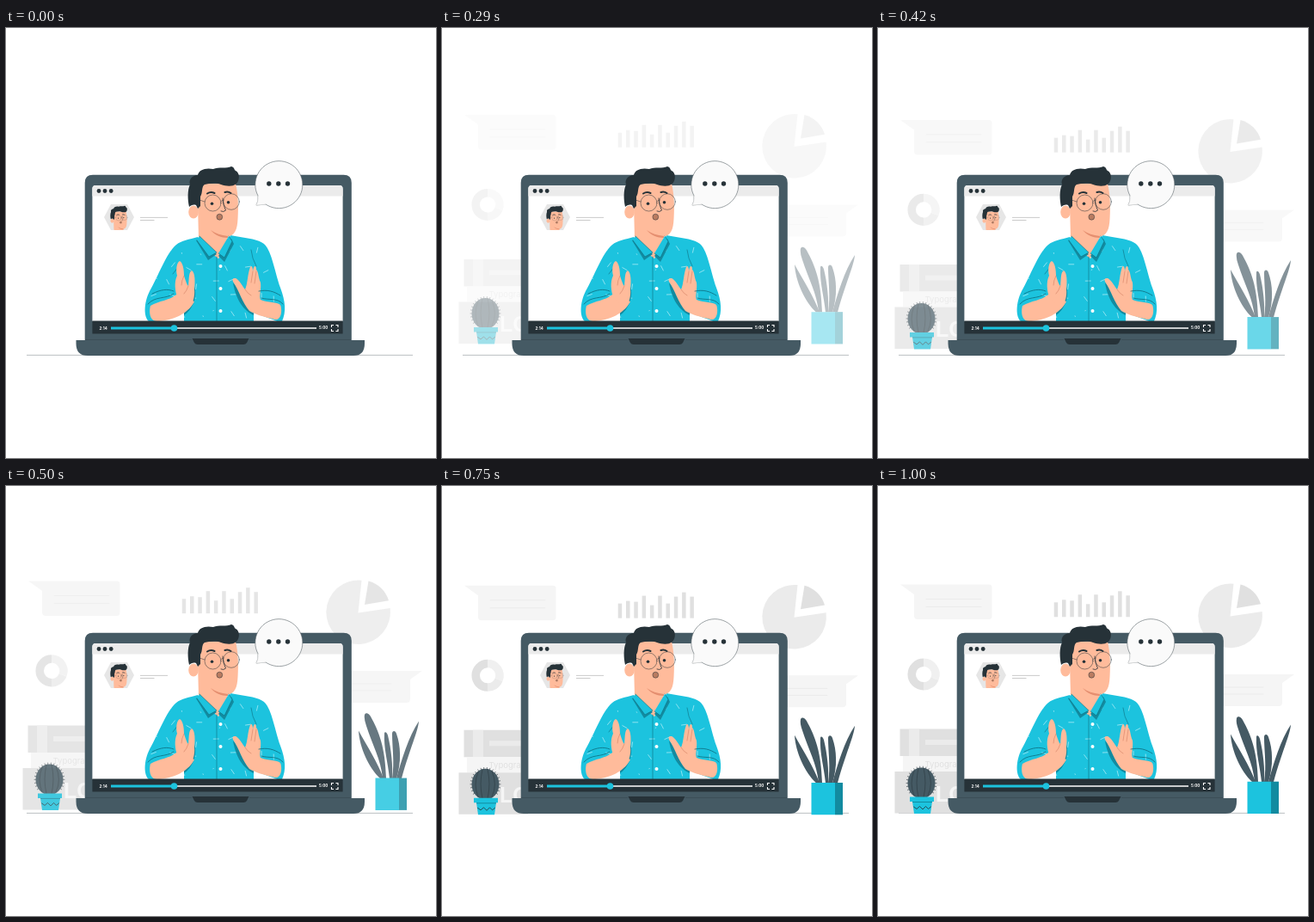
Animation, 500 px wide and 500 px high, one loop 1040 ms. Source, as an HTML page:

```html
<!DOCTYPE html>
<html lang="en">
<head>
<meta charset="utf-8">
<title>Video call</title>
<style>
  html, body { margin: 0; width: 100%; height: 100%; overflow: hidden; background: #fff; }
  svg { display: block; width: 100%; height: 100%; }
  text { font-family: Inter, "Open Sans", sans-serif; }
  .line { fill: none; stroke-linecap: round; stroke-linejoin: round; }
</style>
</head>
<body>
<svg viewBox="0 0 500 500">
  <defs>
    <clipPath id="hex"><path d="M114 220L122 205H141L149 220L141 235H122Z"/></clipPath>
    <path id="shirt" d="M223 243C213 246 204 247 198 252C186 262 177 289 167 306C160 320 160 336 166 341H321C326 330 325 318 319 302C313 285 309 260 301 252C295 245 275 244 261 241L247 268Z"/>
    <clipPath id="shirtClip"><use href="#shirt"/></clipPath>

    <g id="head">
      <path fill="#ffbb9b" d="M226 181L267 181C270 194 270.500 206 269.500 222C269 234 266 242 257 242.500L258 248L247 268C238 262 230 252 224 244L223 206Z"/>
      <ellipse cx="218" cy="214" rx="5.800" ry="7.500" fill="#ffbb9b"/>
      <path fill="#e58f70" d="M238 235C244 239 250 241 258 242L258 244C250 244 243 241 238 235Z"/>
      <path fill="#263238" d="M213 208C211 199 211 188 214 182C212 176 217 171 223 171C224 165 232 162 241 164C247 161 257 164 262 161C266 162 265 165 267 166C272 168 272 177 268 181C263 185 256 184 250 182C243 179 236 181 231 182C227 184 229 192 226 196L226 207L223 210L221 206C218 205 215 206 213 208Z"/>
      <g class="line" stroke="#263238" stroke-width=".5">
        <circle cx="240.500" cy="203.500" r="9.500"/>
        <circle cx="262" cy="202" r="9.300"/>
        <path d="M231 202L222 199M250 202Q251 199.500 253 200"/>
        <path stroke-width=".8" d="M252 198C252 204 254 208 255.500 212Q253 214.500 250 213"/>
        <path stroke-width="2" d="M234 192.500Q238 190 242.500 192M254.500 191Q258 189.500 261.500 192"/>
      </g>
      <circle cx="239.500" cy="204.300" r="1.800" fill="#263238"/>
      <circle cx="258.500" cy="202.800" r="1.800" fill="#263238"/>
      <ellipse cx="248.300" cy="219.700" rx="3.400" ry="3.500" fill="#b97b60" stroke="#263238" stroke-width=".5"/>
    </g>
  </defs>

  <rect width="500" height="500" fill="#fff"/>
  <path stroke="#b5b9bb" stroke-width=".9" d="M24 380.400H473"/>

  <g class="drop">
    <path fill="#f5f5f5" d="M26 114.500H129Q132.500 114.500 132.500 118V151Q132.500 155 129 155H46Q42 155 42 151V126Z"/>
    <path class="line" stroke="#ebebeb" d="M56 131.500H120M56 140.500H120"/>
    <g id="bars" fill="#e0e0e0"></g>
    <path fill="#ebebeb" d="M409.500 151.500L413.500 113.800A37.300 37.300 0 1 0 446.600 146Z"/>
    <path fill="#e0e0e0" d="M417 142L421.500 114.500A33 33 0 0 1 445 137.300Z"/>
    <g class="line" stroke-width="9.500" style="stroke-linecap:butt">
      <path stroke="#e0e0e0" d="M53 205.200A13.800 13.800 0 0 0 53 232.800"/>
      <path stroke="#f0f0f0" d="M53 205.200A13.800 13.800 0 0 1 66 224"/>
      <path stroke="#ebebeb" d="M66 224A13.800 13.800 0 0 1 53 232.800"/>
    </g>
    <path fill="#f5f5f5" d="M390 219H484L470 229V252Q470 256 466 256H390Z"/>
    <path class="line" stroke="#ebebeb" d="M400 234H448M400 242H448"/>
    <path fill="#e0e0e0" d="M25.500 282.500H100V314H25.500Z"/>
    <path fill="#ebebeb" d="M36 282.500H48V314H36ZM55 295H100V301H55Z"/>
    <path fill="#f5f5f5" d="M29 314H100V332H29Z"/>
    <text x="54.500" y="327" font-size="9.500" fill="#e0e0e0">Typography</text>
    <path fill="#e0e0e0" d="M19.500 332H100V380.500H19.500Z"/>
    <text x="67" y="367" font-size="25" font-weight="700" fill="#f5f5f5" style="font-family:'Liberation Sans',sans-serif">LO</text>
  </g>

  <g class="drop">
    <g fill="#455a64">
      <path d="M410 288.500C411 308 422 332 435 344H439C433 327 419 305 410 288.500Z"/>
      <path d="M417 270C418 267 422 268 424 272C434 290 441 308 442 344H438C436 322 426 305 419 283Q416 275 417 270Z"/>
      <path d="M440 292C440 289 443 290 444 294C448 310 450 330 449 344H446C444 325 439 308 440 292Z"/>
      <path d="M449 292C449 288 453 288 454 292C459 306 460 325 454 344H449C452 325 449 308 449 292Z"/>
      <path d="M480 277.500C479 290 470 308 460 344H454C460 322 468 296 480 277.500Z"/>
    </g>
    <path fill="#1cc3de" d="M429.500 343.700H457V381H429.500Z"/>
    <path fill="#128ba0" d="M457 343.700H466V381H457Z"/>
    <path id="spikes" class="line" stroke="#263238" stroke-width=".6"/>
    <ellipse cx="50.500" cy="345.500" rx="16" ry="18" fill="#455a64"/>
    <path class="line" stroke="#263238" stroke-width=".5" d="M42 331Q36 346 42 360M47 328Q43 345 47 362M53 328Q57 345 53 362M58 330Q65 346 58 360"/>
    <path fill="#1cc3de" d="M37 361.500H65V367H63L61 381H42L40 367H37Z"/>
    <path fill="#128ba0" d="M40 367H63V368H40Z"/>
    <path class="line" stroke="#263238" stroke-width=".8" d="M41.500 373L45 375.500L48.500 372.500L52 376L55.500 372.500L58.500 375.500L61.500 373"/>
  </g>

  <path fill="#455a64" d="M91.700 363V180Q91.700 170.800 101 170.800H392.500Q401.800 170.800 401.800 180V363H417V367Q417 381 404 381H95Q81.500 381 81.500 367V363Z"/>
  <path fill="#fff" d="M100.400 341V187Q100.400 183 104 183H388Q391.600 183 391.600 187V341Z"/>
  <path fill="#ebebeb" d="M100.400 195.500V187Q100.400 183 104 183H388Q391.600 183 391.600 187V195.500Z"/>
  <path fill="#263238" d="M216.500 361H282.500L280 366Q279 368 276 368H223Q220 368 219 366Z"/>
  <path stroke="#37474f" stroke-width=".6" d="M92 362.500H216M283 362.500H401"/>
  <g fill="#263238"><circle cx="108" cy="189.500" r="2.400"/><circle cx="115" cy="189.500" r="2.400"/><circle cx="122.200" cy="189.500" r="2.400"/></g>

  <path fill="#e6e6e6" d="M114 220L122 205H141L149 220L141 235H122Z"/>
  <g clip-path="url(#hex)"><use href="#head" transform="translate(51.500 153.700) scale(.33)"/></g>
  <path stroke="#c4c4c4" stroke-width=".9" d="M156 220.400H188M156 223.500H172.500"/>

  <use href="#shirt" fill="#1cc3de"/>
  <path id="dashes" class="line" stroke="#d8f6fb" stroke-width=".6" clip-path="url(#shirtClip)"/>
  <use href="#head"/>
  <path fill="#128ba0" d="M221 247L235 270L245 263L227 246ZM262 245L265 251L254 272L247 265Z"/>
  <path fill="#1cc3de" d="M225 242L245 261L236 266L222 247ZM259 242L263 248L254 267L247 262Z"/>
  <path class="line" stroke="#0e6d7e" stroke-width=".6" d="M225 242L245 261L236 266L222 247M259 242L263 248L254 267L247 262M245 266V341M194 286Q199 280 201 276M291 277Q286 268 285 258"/>
  <g fill="#fff"><circle cx="249.500" cy="277" r="2"/><circle cx="249.500" cy="303" r="2"/><circle cx="249.500" cy="329" r="2"/>
    <path d="M176 341.500L207 328V341.500ZM288 341.500V331L317 341.500Z"/></g>
  <path fill="#128ba0" d="M219 300C223 314 216 328 207 334V326ZM264 296C266 310 273 327 288 334V325Z"/>

  <g fill="#ffbb9b">
    <path d="M168 323C178 317 190 317 198 310L219 318C212 332 195 340 176 341C167 341 166 330 168 323Z"/>
    <path d="M199 313C195 300 197 292 199 288C197 280 199 272 202 271C206 273 207 282 207 288C209 294 210 298 212 300C213 293 212 284 216 282C220 284 220 296 219 304C220 312 217 322 212 327Z"/>
    <path d="M266 291C269 290 273 297 278 304C281 298 281 285 284 278C286 275 287 279 287 283C288 275 291 276 291 281C294 284 293 290 296 296C297 305 294 312 296 316C305 320 315 318 319 322C322 330 319 340 313 339C300 336 290 333 283 329C275 320 271 305 264 295C263 292 264 291 266 291Z"/>
  </g>
  <path class="line" stroke="#0e6d7e" stroke-width=".8" d="M165 321C174 311 185 316 195 309M170 309C180 304 188 303 195 306M297 314C306 317 315 313 322 321M294 306C304 304 311 306 319 311"/>
  <path class="line" stroke="#c9745a" stroke-width=".5" d="M207 288Q204 294 204 299M212 300Q210 306 207 309M287 283L285 296M291 283L289 297M278 304Q281 309 285 311"/>

  <path fill="#263238" d="M100.400 340.400H391.600V355.500H100.400Z"/>
  <path stroke="#fff" stroke-width="1.300" d="M122 349H361"/>
  <path stroke="#1cc3de" stroke-width="3" d="M122 349H195"/>
  <circle cx="195.500" cy="349" r="3.800" fill="#1cc3de"/>
  <g fill="#fff" font-size="4.500" font-weight="700"><text x="108.500" y="350.700">2:14</text><text x="364" y="350.300">5:00</text></g>
  <path fill="none" stroke="#fff" stroke-width="1.100" d="M378.500 348V345.500H381M383.500 345.500H386V348M386 350V352.500H383.500M381 352.500H378.500V350"/>

  <path fill="#fafafa" stroke="#5b666b" stroke-width=".6" d="M293 195A27.500 27.500 0 1 1 302 205L291 206Q294 201 293 195Z"/>
  <path fill="#fafafa" stroke="#e0e0e0" stroke-width=".6" d="M293 195Q294 201 291 206L302 205"/>
  <g fill="#263238"><circle cx="305.800" cy="181" r="2.700"/><circle cx="316.800" cy="181" r="2.700"/><circle cx="327.500" cy="181" r="2.700"/></g>
</svg>
<script>
const byId = id => document.getElementById(id);

byId('bars').innerHTML = [17, 20, 19, 26, 15, 26, 17, 25, 30, 25]
  .map((h, i) => `<rect x="${204.7 + i * 9.3}" y="${152.3 - h}" width="4.5" height="${h}"/>`).join('');

let spikes = '';
for (let i = 0; i < 22; i++) {
  const a = Math.PI * (0.8 + i / 21 * 1.4);
  const point = r => `${50.5 + Math.cos(a) * (15.5 + r)} ${345.5 + Math.sin(a) * (17.5 + r)}`;
  spikes += `M${point(0)}L${point(2)}`;
}
byId('spikes').setAttribute('d', spikes);

// Scattered fabric strokes on a jittered grid
let seed = 11;
const random = () => (seed = seed * 16807 % 2147483647) / 2147483647;
let dashes = '';
for (let y = 254; y < 341; y += 18) {
  for (let x = 166; x < 324; x += 18) {
    const a = random() * Math.PI, r = random() < 0.4 ? 0.4 : 3;
    const cx = x + random() * 11, cy = y + random() * 11;
    const dx = Math.cos(a) * r, dy = Math.sin(a) * r;
    dashes += `M${cx - dx} ${cy - dy}L${cx + dx} ${cy + dy}`;
  }
}
byId('dashes').setAttribute('d', dashes);

const curve = (a, b, s) => 3 * a * s * (1 - s) ** 2 + 3 * b * s * s * (1 - s) + s ** 3;

// cubic-bezier(.36, -.01, .5, 1.38)
function ease(x) {
  if (x >= 1) return 1;
  let lo = 0, hi = 1;
  for (let i = 0; i < 24; i++) {
    const mid = (lo + hi) / 2;
    if (curve(0.36, 0.5, mid) < x) lo = mid; else hi = mid;
  }
  return curve(-0.01, 1.38, lo);
}

const LOOP = 1040, START = 130, FPS = 24, DISTANCE = 22;
const layers = document.querySelectorAll('.drop');

function draw() {
  const t = performance.now() % LOOP;
  const step = Math.floor((t + 4) * FPS / 1000);
  const p = ease(step / FPS + 0.038);
  for (const layer of layers) {
    layer.setAttribute('opacity', t < START ? 0 : Math.min(1, Math.max(0, p)));
    layer.setAttribute('transform', `translate(0 ${(p - 1) * DISTANCE})`);
  }
  requestAnimationFrame(draw);
}
draw();
</script>
</body>
</html>
```
